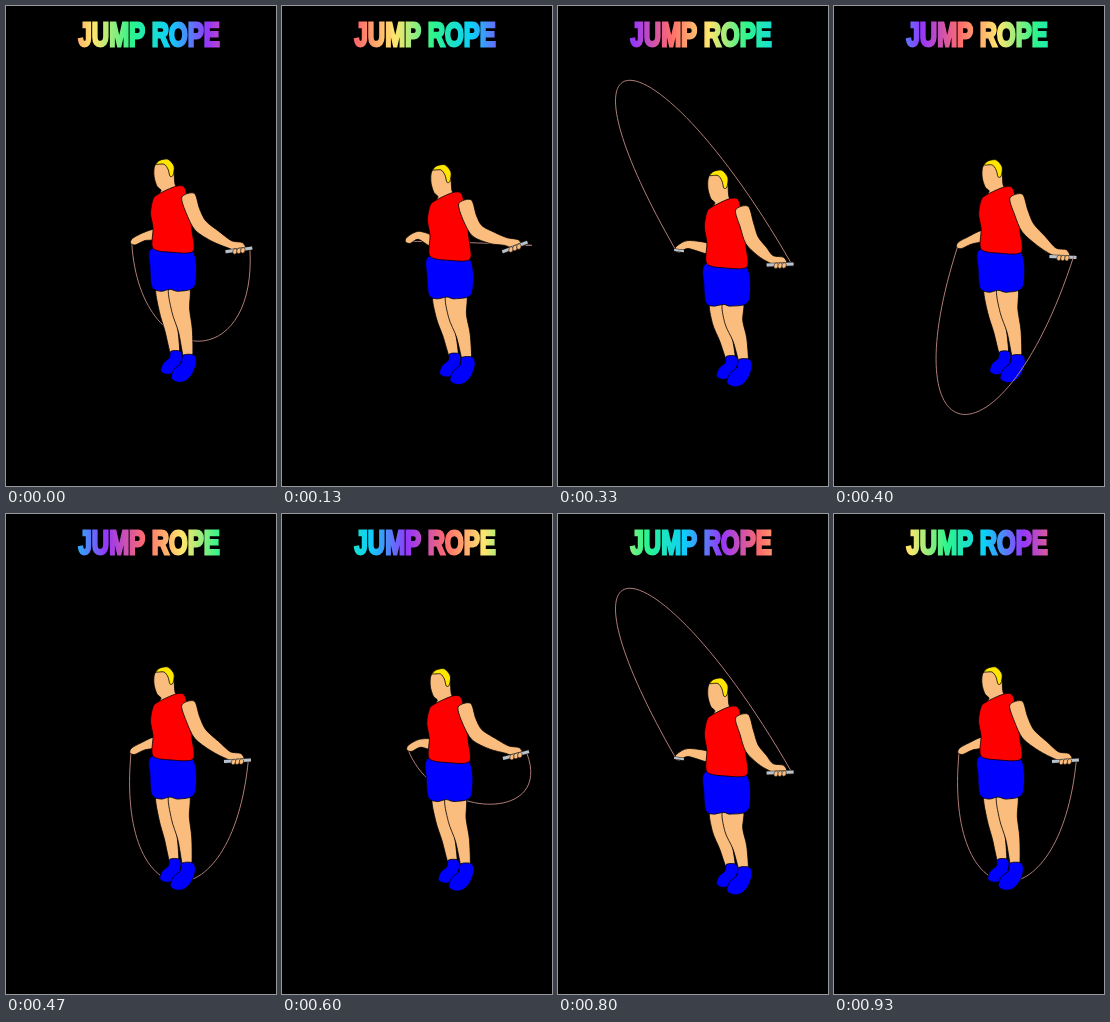
Recreate the animation shown at these times as an HTML page with a canvas. Size 270 by 480 pixels, loop 990 ms.

```html
<!DOCTYPE html>
<html lang="en">
<head>
<meta charset="utf-8">
<title>Jump rope</title>
<style>
html, body { margin: 0; width: 100%; height: 100%; overflow: hidden; background: #000; }
canvas { display: block; width: 270px; height: 480px; }
</style>
</head>
<body>
<canvas id="stage"></canvas>
<script>
const W = 270, H = 480, LOOP = 990, STEPS = 15;
const SKIN = '#fabd7e', RED = '#f00', BLUE = '#00f', HAIR = '#ffe600', GREY = '#b9c2ca', ROPE = '#ae7d78';
const RAINBOW = ['#ff6b6b', '#ffe66d', '#2cf58c', '#0cd0fa', '#9636fa', '#ff6b6b'];
const canvas = document.getElementById('stage');
const ctx = canvas.getContext('2d');
const dpr = window.devicePixelRatio || 1;
canvas.width = W * dpr;
canvas.height = H * dpr;

// Rope angle of each pose in degrees: 0 under the feet, 90 behind, 180 overhead.
const TURN = [20, 50, 90, 130, 180, 225, 334, 360];

// Corner points of the stretched body; joints are x, y, radius.
const HEAD = [[149, 159], [148, 170], [151, 180], [155, 184], [153, 190], [173, 186], [169, 178], [167, 160], [158, 154]];
const HAIRCUT = [[150, 158], [154, 154], [162, 153], [168, 160], [167, 169], [164, 170], [162, 163], [158, 158]];
const SHIRT = [[152, 188], [170, 180], [179, 182], [183, 204], [186, 225], [187, 245], [166, 246], [147, 242], [147, 222], [144.5, 207], [147, 193]];
const SHORTS = [[146, 242], [186, 244], [189, 279], [173, 285], [164, 283], [155, 285], [146, 281], [144, 262]];
const SHOE = [[-5, -1], [6, -1], [8, 7], [4, 18], [-3, 25], [-11, 26], [-17, 22], [-14, 13], [-7, 7]];
const LEG_L = [[158, 280, 8], [160, 304, 7.5], [164, 324, 6.5], [167, 348, 4.5]];
const LEG_R = [[173, 280, 10], [174, 304, 9], [178, 325, 7], [180, 352, 4.5]];
const ARM_L = [[150, 228, 5], [138, 233, 4], [128, 238, 3.5]];
const ARM_R = [[182, 189, 6.5], [187, 205, 7], [194, 220, 7], [208, 232, 6], [221, 241, 4], [232, 244, 5]];

const clamp = (v, lo, hi) => Math.max(lo, Math.min(hi, v));
const mix = (a, b, f) => a + (b - a) * f;
const rad = deg => deg * Math.PI / 180;

// Everything in a pose follows from the rope angle.
function poseAt(deg) {
  const swing = (mid, amp, peak) => mid + amp * Math.cos(rad(deg - peak));
  const bend = swing(.5, -.53, 5) + .03;
  return {
    bend,
    foot: 6 * bend ** .25,
    right: [swing(-2, 6, 55), swing(3.5, -9.5, 70)],
    left: [swing(-4, 4, 40), swing(1, -5, 70)],
    tilt: rad(swing(-8, -14, 110)),
    down: Math.cos(rad(deg)),
    depth: Math.sin(rad(deg)),
    front: deg > 270 && deg < 360,
  };
}

// Lower a body point as the knees bend; the feet slide sideways.
function warp([x, y], p) {
  const sink = Math.max(4, Math.min(12 + .055 * (y - 153), 17 - .17 * (y - 280)));
  const slide = y < 285 ? 2 * p.bend : p.foot * clamp((y - 285) / 60, 0, 1);
  return [x + slide, y + p.bend * sink];
}

// Arm joints pass from following the body to following the hand.
function reach(joints, hand, p) {
  return joints.map(([x, y, r], i) => {
    const f = clamp((i + 1) / (joints.length - 1) * 2 - 1, 0, 1);
    const [bx, by] = warp([x, y], p);
    return [mix(bx, x + hand[0], f), mix(by, y + hand[1], f), r];
  });
}

// Outline of a limb around its joints
function limb(joints) {
  const a = [], b = [], last = joints.length - 1;
  joints.forEach(([x, y, r], i) => {
    const from = joints[Math.max(0, i - 1)], to = joints[Math.min(last, i + 1)];
    const t = Math.atan2(to[1] - from[1], to[0] - from[0]);
    a.push([x + r * Math.sin(t), y - r * Math.cos(t)]);
    b.unshift([x - r * Math.sin(t), y + r * Math.cos(t)]);
    const end = [x + r * Math.cos(t), y + r * Math.sin(t)];
    if (i === last) a.push(end);
  });
  return [...a, ...b];
}

function line(color, width) {
  ctx.strokeStyle = color;
  ctx.lineWidth = width;
  ctx.stroke();
}

// Closed Catmull-Rom curve, filled and outlined
function shape(color, pts) {
  const n = pts.length, at = i => pts[(i + n) % n];
  ctx.beginPath();
  ctx.moveTo(...pts[0]);
  for (let i = 0; i < n; i++) {
    const a = at(i - 1), b = at(i), c = at(i + 1), d = at(i + 2);
    ctx.bezierCurveTo(b[0] + (c[0] - a[0]) / 7, b[1] + (c[1] - a[1]) / 7,
      c[0] - (d[0] - b[0]) / 7, c[1] - (d[1] - b[1]) / 7, c[0], c[1]);
  }
  ctx.closePath();
  ctx.fillStyle = color;
  ctx.fill();
  line('#000', .8);
}

// The rope turns in a circle seen in perspective: larger in front, smaller behind.
function drawRope(p) {
  const near = 1 / (1 + .7 * p.depth);
  const dx = (74 * p.depth - 16) * near, dy = 168 * p.down * near;
  const [x1, y1] = [126 + p.left[0], 239 + p.left[1]];
  const [x2, y2] = [241 + p.right[0], 245 + p.right[1]];
  ctx.beginPath();
  ctx.moveTo(x1, y1);
  ctx.bezierCurveTo(x1 + dx, y1 + dy, x2 + dx, y2 + dy, x2, y2);
  line(ROPE, 1);
}

function drawGrip(x, y, tilt, half, width) {
  const dx = half * Math.cos(tilt), dy = half * Math.sin(tilt);
  ctx.beginPath();
  ctx.moveTo(x - dx, y - dy);
  ctx.lineTo(x + dx, y + dy);
  line('#222', width + 1.2);
  line(GREY, width);
}

function drawFingers(x, y, tilt) {
  for (let i = -1; i <= 1; i++) {
    ctx.beginPath();
    ctx.ellipse(x + i * 4, y + 1 + i * 4 * Math.sin(tilt), 2.1, 2.8, .3, 0, 7);
    ctx.fillStyle = SKIN;
    ctx.fill();
    line('#000', .5);
  }
}

function drawLeg(joints, size, p) {
  const bent = joints.map(j => [...warp(j, p), j[2]]);
  const [x, y] = bent[bent.length - 1];
  shape(SKIN, limb(bent));
  shape(BLUE, SHOE.map(([sx, sy]) => [x + sx * size, y - 2 + sy * size]));
}

function drawTitle(t) {
  const squeeze = .705, wave = 190 / squeeze, lead = -.12;
  ctx.save();
  ctx.translate(72.5, 40);
  ctx.scale(squeeze, 1);
  const g = ctx.createLinearGradient((t + lead - 1) * wave, 0, (t + lead + 1) * wave, 0);
  for (const turn of [0, 1])
    RAINBOW.forEach((color, i) => g.addColorStop((turn + i / 5) / 2, color));
  ctx.font = 'bold 34px "Liberation Sans", Arial, sans-serif';
  ctx.lineJoin = 'miter';
  ctx.miterLimit = 3;
  ctx.lineWidth = 2.8;
  ctx.fillStyle = ctx.strokeStyle = g;
  ctx.strokeText('JUMP ROPE', 0, 0);
  ctx.fillText('JUMP ROPE', 0, 0);
  ctx.restore();
}

function draw(step) {
  // Sixteen poses, two turns, are spread over the fifteen steps.
  const p = poseAt(TURN[Math.floor(step * 16 / STEPS + .3) % 8]);
  const body = pts => pts.map(pt => warp(pt, p));
  const gripX = 230 + p.right[0], gripY = 246.5 + p.right[1];

  ctx.setTransform(dpr, 0, 0, dpr, 0, 0);
  ctx.fillStyle = '#000';
  ctx.fillRect(0, 0, W, H);
  ctx.lineJoin = 'round';
  drawTitle(step / STEPS);

  if (!p.front) drawRope(p);
  drawLeg(LEG_L, .85, p);
  drawLeg(LEG_R, 1, p);
  shape(BLUE, body(SHORTS));
  shape(SKIN, limb(reach(ARM_L, p.left, p)));
  if (p.down < -.5) drawGrip(129 + p.left[0], 239 + p.left[1], .15, 5, 2);
  shape(SKIN, body(HEAD));
  shape(HAIR, body(HAIRCUT));
  shape(RED, body(SHIRT));
  shape(SKIN, limb(reach(ARM_R, p.right, p)));
  drawGrip(gripX, gripY, p.tilt, 13.5, 3);
  drawFingers(gripX, gripY, p.tilt);
  if (p.front) drawRope(p);
}

let shown = -1;
const start = performance.now();
function tick() {
  const ms = (performance.now() - start) % LOOP;
  const step = Math.floor((ms + 4) * STEPS / 1000);
  if (step !== shown) draw(shown = step);
  requestAnimationFrame(tick);
}
tick();
</script>
</body>
</html>
```
